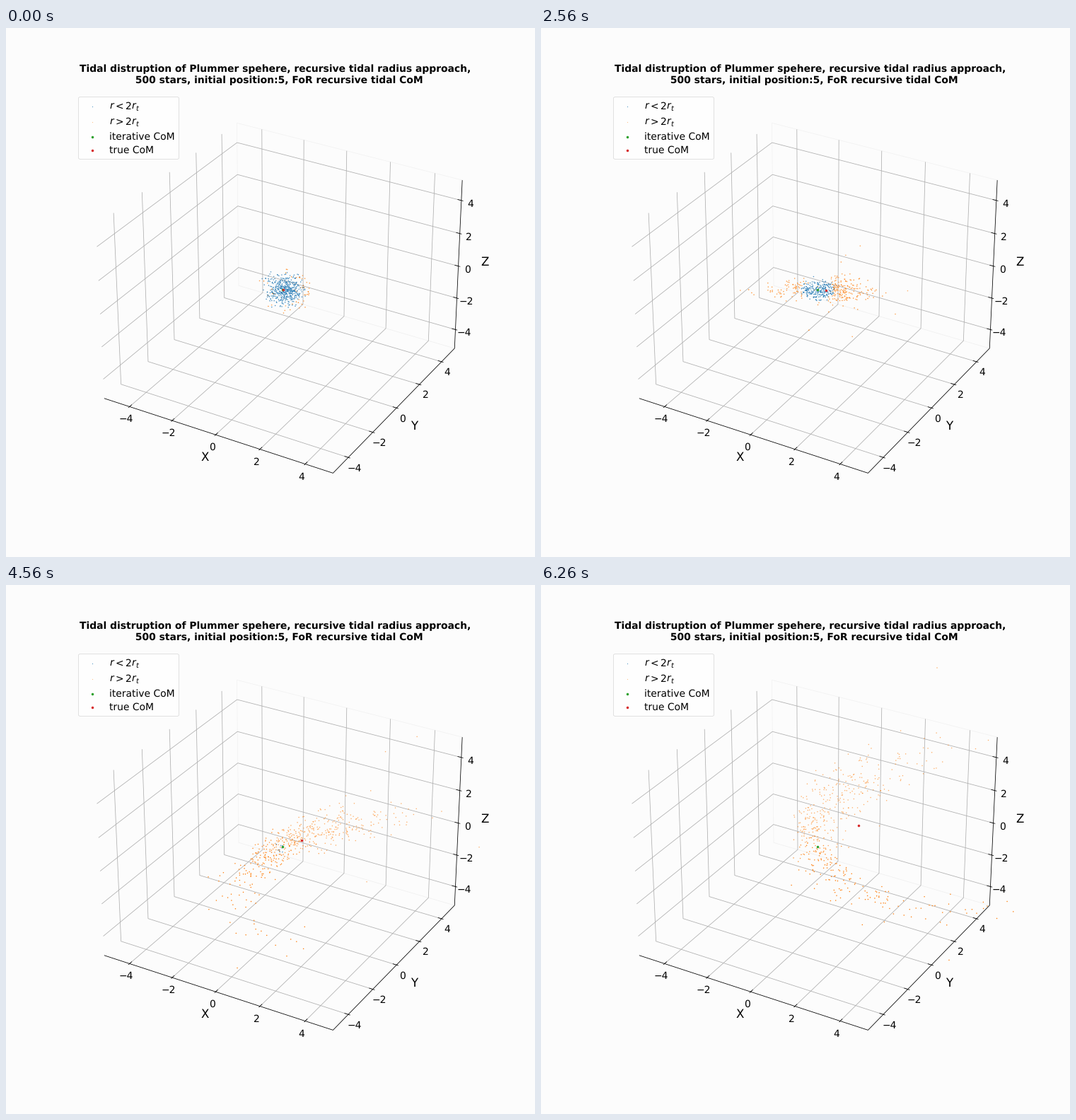
Animation of 748 by 748 pixels, one loop 6410 ms. Source, as a matplotlib script:

```python
import numpy as np
import matplotlib.pyplot as plt
from matplotlib.animation import FuncAnimation
from matplotlib.colors import to_rgb

# Stage
SIZE, DPI = 748, 68
PX = 72 / DPI                      # points per pixel
FONT = 20 * SIZE / 15 / 72 * PX    # 20 pt on a 15 inch sheet
BG = "#fcfcfc"

# Timing: a long first hold, then one step about every 100 ms
LOOP, FRAMES = 6410, 128
HOLD, LAST = 15, 56

# 3D view: limits of +-5 with a small margin, elev 30, azim -60, distance 10
EDGE = 5 * 25 / 24
TICKS = range(-4, 5, 2)
BOX = 1.8294640721620434 * np.array([4, 4, 3]) / np.sqrt(41) / 10
EYE = np.array([np.sqrt(3) / 4, -0.75, 0.5])
RIGHT = np.array([np.sqrt(3) / 2, 0.5, 0])
UP = np.cross(EYE, RIGHT)
LOW, HIGH = -0.095, 0.09

SIDE = 0.77 * SIZE
LEFT = 0.125 * SIZE + (0.775 * SIZE - SIDE) / 2
SCALE = SIDE / (HIGH - LOW)

BLUE, ORANGE = to_rgb("tab:blue"), to_rgb("tab:orange")


def project(points):
    p = np.asarray(points, float) * BOX
    depth = 10 - p @ EYE
    return np.stack([p @ RIGHT / depth, p @ UP / depth], axis=-1)


def dot(px):
    return (px * PX) ** 2


# Star cluster on a circular orbit around a point mass
OMEGA = np.radians(3.5)
ORBIT = 5
HOST_GM = OMEGA ** 2 * ORBIT ** 3
CLUSTER_GM = 0.0032 * HOST_GM
CORE, CUTOFF = 0.55, 1.15
N_STARS, N_KICKED = 500, 14
FASTEST = (-1, 0, -1.3)

# True centre of mass: pixels from the cluster centre at a few steps
COM_STEPS = [0, 12, 25, 33, 45, 56]
COM_X = [1, 8, 16, 16, 37, 58]
COM_Y = [0, -2, 0, 2, 16, 30]


def directions(rng, n):
    v = rng.normal(size=(n, 3))
    return v / np.linalg.norm(v, axis=1, keepdims=True)


def make_cluster(rng):
    m_max = (1 + (CORE / CUTOFF) ** 2) ** -1.5
    mass = rng.uniform(0.002, m_max, N_STARS)
    r = CORE / np.sqrt(mass ** (-2 / 3) - 1)
    pos = directions(rng, N_STARS) * r[:, None]
    sigma = np.sqrt(CLUSTER_GM / 6 / np.sqrt(r ** 2 + CORE ** 2))
    vel = np.clip(rng.normal(size=(N_STARS, 3)), -2, 2) * sigma[:, None]
    vel -= vel.mean(axis=0)
    # outward offset: more stars end up in the trailing tail
    pos[:, 0] += 0.12
    # close encounters throw a few stars out
    speed = rng.uniform(0.06, 0.22, (N_KICKED, 1))
    vel[:N_KICKED] = directions(rng, N_KICKED) * speed
    pos[0], vel[0] = 0, FASTEST
    return pos, vel


def acceleration(pos, t):
    host = -ORBIT * np.array([np.cos(OMEGA * t), np.sin(OMEGA * t), 0])
    d = pos - host
    pull = -HOST_GM * d / ((d ** 2).sum(1, keepdims=True) + 0.1) ** 1.5
    gm = CLUSTER_GM * max(0, 1 - t / 42)
    own = -gm * pos / ((pos ** 2).sum(1, keepdims=True) + CORE ** 2) ** 1.5
    return pull + own - OMEGA ** 2 * host


def simulate(substeps=5):
    pos, vel = make_cluster(np.random.default_rng(5))
    dt = 1 / substeps
    history = [pos.copy()]
    acc = acceleration(pos, 0)
    for i in range(1, LAST * substeps + 1):
        vel = vel + acc * dt / 2
        pos = pos + vel * dt
        acc = acceleration(pos, i * dt)
        vel = vel + acc * dt / 2
        if i % substeps == 0:
            history.append(pos.copy())
    return history


STARS = simulate()

# Static scene
plt.rcParams["font.family"] = "DejaVu Sans"
plt.rcParams["text.hinting"] = "none"
fig = plt.figure(figsize=(SIZE / DPI, SIZE / DPI), dpi=DPI, facecolor=BG)
ax = fig.add_axes([LEFT / SIZE, 0.11, SIDE / SIZE, SIDE / SIZE], facecolor=BG)
ax.set(xlim=(LOW, HIGH), ylim=(LOW, HIGH))
ax.set_axis_off()


def path(points, color, width=0.8, z=1):
    x, y = project(points).T
    ax.plot(x, y, color=color, lw=width * PX, zorder=z,
            solid_capstyle="butt", solid_joinstyle="round")


def label(point, text, size, va):
    x, y = project(point)
    ax.text(x, y, text, fontsize=size, ha="center", va=va)


def draw_box():
    e = EDGE
    # faint outline of the back wall
    path([(-e, e, -e), (-e, e, e), (e, e, e)], "#f1f1f1", 0.7, 0)
    path([(-e, e, -e), (e, e, -e)], "#efefef", 0.7, 0)

    far, pad, tick_out, tick_in = e + 0.2766, e + 0.794, e + 1 / 12, e - 1 / 6
    for t in TICKS:
        name = str(t).replace("-", "\u2212")
        path([(t, -e, -e), (t, e, -e), (t, e, e)], "#b0b0b0")
        path([(e, t, -e), (-e, t, -e), (-e, t, e)], "#b0b0b0")
        path([(-e, -e, t), (-e, e, t), (e, e, t)], "#b0b0b0")
        path([(t, -tick_out, -e), (t, -tick_in, -e)], "black", z=2)
        path([(tick_out, t, -e), (tick_in, t, -e)], "black", z=2)
        path([(tick_out, e, t), (tick_in, e, t)], "black", z=2)
        label((t, -far, -far), name, FONT, "top")
        label((far, t, -far), name, FONT, "top")
        label((far, far, t), name, FONT, "top")

    path([(-e, -e, -e), (e, -e, -e), (e, e, -e)], "black", z=2)
    path([(e, e, -e), (e, e, e)], "black", z=2)
    label((0, -pad, -pad), "X", 1.2 * FONT, "center")
    label((pad, 0, -pad), "Y", 1.2 * FONT, "center")
    label((pad, pad, 0), "Z", 1.2 * FONT, "center")


def draw_legend():
    rows = [("$r<2r_t$", "tab:blue", 1.2, 0.8),
            ("$r>2r_t$", "tab:orange", 1.2, 0.5),
            ("iterative CoM", "tab:green", 3.5, 1),
            ("true CoM", "tab:red", 3.5, 1)]
    handles = [ax.scatter([], [], s=dot(d), color=c, alpha=a, lw=0, label=text)
               for text, c, d, a in rows]
    legend = ax.legend(handles=handles, loc="upper left", fontsize=FONT,
                       scatterpoints=1, labelspacing=0.41, handletextpad=0.75)
    legend.get_frame().set_linewidth(0.7 * PX)


draw_box()
draw_legend()
fig.text(0.5125, 1 - 78 / SIZE,
         "Tidal distruption of Plummer spehere, recursive tidal radius approach, \n"
         " 500 stars, initial position:5, FoR recursive tidal CoM",
         fontsize=FONT, fontweight="bold", ha="center", va="baseline")

# Moving parts
stars = ax.scatter([], [], s=dot(1.5), lw=0, zorder=4)
ax.scatter([0], [0], s=dot(3.5), color="tab:green", lw=0, zorder=5)
true_com = ax.scatter([0], [0], s=dot(3.5), color="tab:red", lw=0, zorder=6)


def star_colors(pos, limit):
    rgba = np.empty((len(pos), 4))
    outside = np.linalg.norm(pos, axis=1) > limit
    rgba[:, :3] = np.where(outside[:, None], ORANGE, BLUE)
    rgba[:, 3] = np.clip(0.8 + 0.15 * (pos @ EYE), 0.6, 1)
    return rgba


def update(frame):
    step = 0 if frame < HOLD else min(LAST, 1 + (frame - HOLD) // 2)
    pos = STARS[step]
    limit = max(0, 1 - step / 50) ** 0.8
    stars.set_offsets(project(pos))
    stars.set_facecolor(star_colors(pos, limit))

    com = [np.interp(step, COM_STEPS, c) / SCALE for c in (COM_X, COM_Y)]
    true_com.set_offsets([com])
    return stars, true_com


anim = FuncAnimation(fig, update, frames=FRAMES, interval=LOOP / FRAMES,
                     init_func=lambda: update(0), repeat=True, repeat_delay=0)
plt.show()
```
